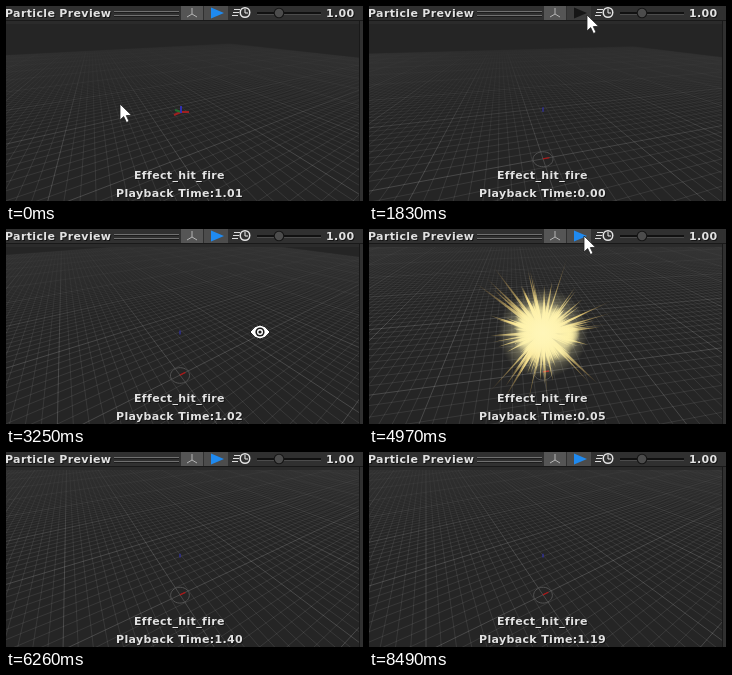
Animation, 357 px wide and 195 px high, one loop 8.57 s. Source, as an HTML page with a canvas:

```html
<!DOCTYPE html>
<html lang="en">
<head>
<meta charset="utf-8">
<title>Particle Preview</title>
<style>
html, body { margin: 0; width: 100%; height: 100%; overflow: hidden; background: #252525; }
canvas { display: block; }
</style>
</head>
<body>
<canvas id="stage" width="357" height="195"></canvas>
<script>
const ctx = document.getElementById('stage').getContext('2d');
const LOOP = 8570, TICK = 127.5, TAU = Math.PI * 2;
const CX = 174, CY = 104, FOCAL = 153, GROUND = 66, CELL = 13, EXTENT = 90;
const BACK = '37,37,37';

// Each play runs until its stop time, then holds at zero until the next one
const plays = [
  { from: 0, stop: 1830, first: 1.01, rate: 1 },
  { from: 2230, stop: 4540, first: 0.01, rate: 0.99 },
  { from: 4970, stop: 6950, first: 0.05, rate: 1.06 },
  { from: 7350, stop: LOOP, first: 0.01, rate: 1.03 }
];

// Orbit drags: the view moves to yaw and pitch, with a sideways swing on the way
const startView = { yaw: 27, pitch: 28 };
const drags = [
  { from: 270, to: 960, yaw: 14, pitch: 27.5, swing: 0 },
  { from: 2740, to: 3490, yaw: 9, pitch: 41, swing: 25 },
  { from: 5240, to: 6260, yaw: 30, pitch: 41, swing: -14 }
];

// Pointer way points: [time, x, y]
const pointer = [[270, 114, 98], [960, 196, 102], [1600, 218, 9], [2230, 218, 9], [2740, 214, 92],
  [3250, 254, 103], [3490, 224, 96], [3760, 216, 8], [4970, 215, 7], [5480, 202, 104],
  [6260, 218, -24], [6600, 218, -24], [6950, 215, 9], [7470, 215, 9], [7710, 222, -24]];

const clamp = v => Math.max(0, Math.min(1, v));
const mix = (a, b, u) => a + (b - a) * u;

function randomizer(seed) {
  return () => {
    seed = (seed * 1664525 + 1013904223) % 4294967296;
    return seed / 4294967296;
  };
}

function pointerAt(t) {
  let [, x, y] = pointer[0];
  for (let i = 1; i < pointer.length; i++) {
    const begin = pointer[i - 1][0], u = clamp((t - begin) / (pointer[i][0] - begin));
    x = mix(x, pointer[i][1], u);
    y = mix(y, pointer[i][2], u);
  }
  return [x, y];
}

function cameraAt(t) {
  let { yaw, pitch } = startView;
  for (const d of drags) {
    const u = clamp((t - d.from) / (d.to - d.from));
    yaw = mix(yaw, d.yaw, u) + d.swing * Math.sin(Math.PI * u);
    pitch = mix(pitch, d.pitch, u);
  }
  return makeView(yaw * TAU / 360, pitch * TAU / 360);
}

function line(points, color, width = 1) {
  ctx.beginPath();
  points.forEach(([x, y]) => ctx.lineTo(x, y));
  ctx.strokeStyle = color;
  ctx.lineWidth = width;
  ctx.stroke();
}

function shape(points, fill) {
  ctx.beginPath();
  points.forEach(([x, y]) => ctx.lineTo(x, y));
  ctx.closePath();
  ctx.fillStyle = fill;
  ctx.fill();
}

function disc(x, y, r, fill) {
  ctx.beginPath();
  ctx.arc(x, y, r, 0, TAU);
  ctx.fillStyle = fill;
  ctx.fill();
}

function rect(x, y, w, h, fill) {
  ctx.fillStyle = fill;
  ctx.fillRect(x, y, w, h);
}

function glow(x, y, r, rgb, alpha) {
  const g = ctx.createRadialGradient(x, y, 0, x, y, r);
  g.addColorStop(0, `rgba(${rgb},${alpha})`);
  g.addColorStop(0.45, `rgba(${rgb},${alpha * 0.55})`);
  g.addColorStop(1, `rgba(${rgb},0)`);
  disc(x, y, r, g);
}

function text(str, x, y) {
  ctx.font = 'bold 11px "DejaVu Sans", sans-serif';
  ctx.letterSpacing = '0.35px';
  ctx.fillStyle = '#151515';
  ctx.fillText(str, x + 1, y + 1);
  ctx.fillStyle = '#e2e2e2';
  ctx.fillText(str, x, y);
}

// Projector for world points, with y measured from the pivot
function makeView(yaw, pitch) {
  const sy = Math.sin(yaw), cy = Math.cos(yaw), sp = Math.sin(pitch), cp = Math.cos(pitch);
  const toEye = ([x, y, z]) => {
    const depth = x * sy + z * cy;
    return [x * cy - z * sy, depth * sp + y * cp, FOCAL + depth * cp - y * sp];
  };
  const flat = ([x, y, d]) => [CX + FOCAL * x / d, CY - FOCAL * y / d];
  return { toEye, flat, project: p => flat(toEye(p)), horizon: CY - FOCAL * Math.tan(pitch) };
}

function groundLine(view, a, b, color) {
  const near = 15;
  let p = view.toEye(a), q = view.toEye(b);
  if (p[2] > q[2]) [p, q] = [q, p];
  if (q[2] < near) return;
  if (p[2] < near) {
    const u = (near - p[2]) / (q[2] - p[2]);
    p = p.map((v, i) => mix(v, q[i], u));
  }
  line([view.flat(p), view.flat(q)], color);
}

function drawGround(view) {
  const far = CELL * EXTENT;
  for (let i = -EXTENT; i <= EXTENT; i++) {
    const color = `rgba(255,255,255,${i % 10 ? 0.085 : 0.16})`, at = i * CELL;
    groundLine(view, [at, -GROUND, -far], [at, -GROUND, far], color);
    groundLine(view, [-far, -GROUND, at], [far, -GROUND, at], color);
  }
  const fog = ctx.createLinearGradient(0, view.horizon + 10, 0, view.horizon + 130);
  fog.addColorStop(0, `rgb(${BACK})`);
  fog.addColorStop(0.3, `rgba(${BACK},.68)`);
  fog.addColorStop(1, `rgba(${BACK},0)`);
  rect(0, 0, 357, 195, fog);
}

function drawGizmos(view, orbited) {
  if (orbited) {
    const ring = Array.from({ length: 33 }, (_, i) =>
      view.project([12 * Math.cos(i / 32 * TAU), -GROUND, 12 * Math.sin(i / 32 * TAU)]));
    line(ring, '#525252');
    line([view.project([0, -GROUND, 0]), view.project([8, -GROUND, 0])], '#a81818', 1.3);
    line([view.project([0, -2, 0]), view.project([0, 3, 0])], '#3030a0', 1.3);
  } else {
    line([[168, 109], [175, 106], [183, 106]], '#a02020', 2);
    line([[175, 106], [169, 104]], '#207030', 2);
    line([[175, 107], [175, 100]], '#3030b0', 2);
  }
}

function drawFlash(age, rand) {
  const power = clamp((0.13 - age) / 0.05);
  if (!power) return;
  const reach = 0.75 + age * 5;
  const fill = ctx.createRadialGradient(CX, CY, 0, CX, CY, 85 * reach);
  fill.addColorStop(0, `rgba(255,247,185,${power})`);
  fill.addColorStop(0.4, `rgba(250,222,130,${0.75 * power})`);
  fill.addColorStop(1, 'rgba(190,135,60,0)');
  for (let i = 0; i < 130; i++) {
    const angle = rand() * TAU, length = (30 + 60 * rand() ** 4) * reach, half = 0.8 + rand() * 2;
    const c = Math.cos(angle), s = Math.sin(angle);
    shape([[CX - s * half, CY + c * half], [CX + c * length, CY + s * length], [CX + s * half, CY - c * half]], fill);
  }
  for (let i = 0; i < 24; i++) {
    const angle = rand() * TAU, out = 30 * Math.sqrt(rand());
    glow(CX + Math.cos(angle) * out, CY + Math.sin(angle) * out, 11, '255,240,160', 0.75 * power);
  }
  glow(CX, CY, 45, '255,246,185', power);
}

function drawFlames(age, rand) {
  const shown = clamp((age - 0.05) / 0.06);
  for (let clump = 0; clump < 8; clump++) {
    const turn = clump * 2.4 + rand(), away = (12 + 30 * rand()) * (0.5 + 0.85 * age);
    const x = CX - 6 + 10 * age + Math.cos(turn) * away;
    const y = CY - 8 + 6 * age + Math.sin(turn) * away;
    const radius = 9 + 8 * rand(), heat = clamp(1.1 - age / (0.65 + 0.25 * rand()));
    const spent = 1 - heat;
    glow(x, y, radius * 1.9, '150,48,12', 0.6 * shown * Math.min(1, heat * 2));
    for (let i = 0; i < 16; i++) {
      const angle = rand() * TAU, off = radius * Math.sqrt(rand()), size = 4 + 6 * rand();
      const green = Math.round(165 - 75 * spent), blue = Math.round(65 * heat);
      glow(x + Math.cos(angle) * off, y + Math.sin(angle) * off - age * 3, size,
        `255,${green},${blue}`, 0.75 * shown * Math.min(1, heat * 1.2));
    }
  }
}

function drawEmbers(age, rand) {
  for (let i = 0; i < 46; i++) {
    const angle = rand() * TAU, reach = 28 + 50 * rand(), life = 0.4 + 0.6 * rand(), big = rand() < 0.2;
    const left = clamp((life - age) / 0.35);
    if (age < 0.07) continue;
    const out = reach * (1 - Math.exp(-7 * age));
    const x = CX + 4 + Math.cos(angle) * out, y = CY + Math.sin(angle) * out * 0.85 + 14 * age * age;
    glow(x, y, big ? 6 : 2.6, big ? '225,80,20' : '255,110,30', 0.9 * left);
  }
}

function drawEffect(seed, age) {
  const rand = randomizer(seed);
  ctx.globalCompositeOperation = 'lighter';
  glow(CX, CY, 105, '180,95,35', 0.42 * clamp((age - 0.06) / 0.06) * clamp((0.5 - age) / 0.36));
  drawFlames(age, rand);
  drawEmbers(age, rand);
  ctx.globalCompositeOperation = 'source-over';
  drawFlash(age, rand);
}

function drawToolbar(playing) {
  rect(0, 0, 357, 15, '#303030');
  rect(0, 14, 357, 1, '#191919');
  rect(0, 15, 357, 3, '#2b2b2b');
  rect(354, 15, 3, 180, '#303030');
  rect(353, 15, 1, 180, '#191919');
  text('Particle Preview', -1, 11);
  for (const y of [5, 9]) {
    rect(108, y, 65, 1, '#707070');
    rect(108, y + 1, 65, 1, '#1c1c1c');
  }
  rect(175, 0, 22, 14, '#555');
  rect(198, 0, 24, 14, playing ? '#4c4c4c' : '#3b3b3b');
  line([[186, 2], [186, 8], [181, 11]], '#b4b4b4');
  line([[186, 8], [191, 11]], '#b4b4b4');
  shape([[205, 1.5], [218, 7], [205, 12.5]], playing ? '#1f8af0' : '#161616');

  for (let i = 0; i < 3; i++) rect(228 - i, 3 + i * 3, 6, 1, '#ddd');
  disc(239, 6.5, 5.5, '#e4e4e4');
  disc(239, 6.5, 4, '#303030');
  line([[239, 3], [239, 7], [242, 7]], '#eee');

  rect(251, 6, 64, 2, '#111');
  rect(251, 8, 64, 1, '#4c4c4c');
  disc(273, 7, 5.3, '#151515');
  disc(273, 7, 4.2, '#4c4c4c');
  text('1.00', 320, 11);
}

function drawArrow(x, y) {
  const outline = [[0, 0], [0, 16], [3.7, 12.6], [6.5, 18.5], [9, 17.3], [6.3, 11.6], [11.5, 11.3]]
    .map(([dx, dy]) => [x + dx, y + dy]);
  shape(outline, '#fff');
  line([...outline, outline[0]], '#222', 0.8);
}

function drawEye(x, y) {
  ctx.beginPath();
  ctx.moveTo(x - 10, y);
  ctx.quadraticCurveTo(x, y - 14, x + 10, y);
  ctx.quadraticCurveTo(x, y + 14, x - 10, y);
  ctx.fillStyle = '#fff';
  ctx.fill();
  ctx.strokeStyle = '#1a1a1a';
  ctx.lineWidth = 1;
  ctx.stroke();
  disc(x, y, 4.6, '#1a1a1a');
  disc(x, y, 3, '#fff');
  disc(x, y, 1.6, '#1a1a1a');
}

function draw(now) {
  const play = plays.filter(p => p.from <= now).pop();
  const elapsed = Math.floor((now - play.from + 15) / TICK) * TICK;
  const playing = now < play.stop;
  const t = Math.min(play.from + elapsed, play.stop);
  const age = playing ? play.first + elapsed / 1000 * play.rate : 0;
  const view = cameraAt(t);

  rect(0, 0, 357, 195, `rgb(${BACK})`);
  drawGround(view);
  drawGizmos(view, t > drags[0].from);
  if (playing && play.first < 1) drawEffect(play.from, age);
  drawToolbar(playing);
  text('Effect_hit_fire', 128, 173);
  text('Playback Time:' + age.toFixed(2), 110, 191);
  const dragging = drags.some(d => t > d.from && t < d.to);
  (dragging ? drawEye : drawArrow)(...pointerAt(t));
}

function frame() {
  draw(performance.now() % LOOP);
  requestAnimationFrame(frame);
}
frame();
</script>
</body>
</html>
```
